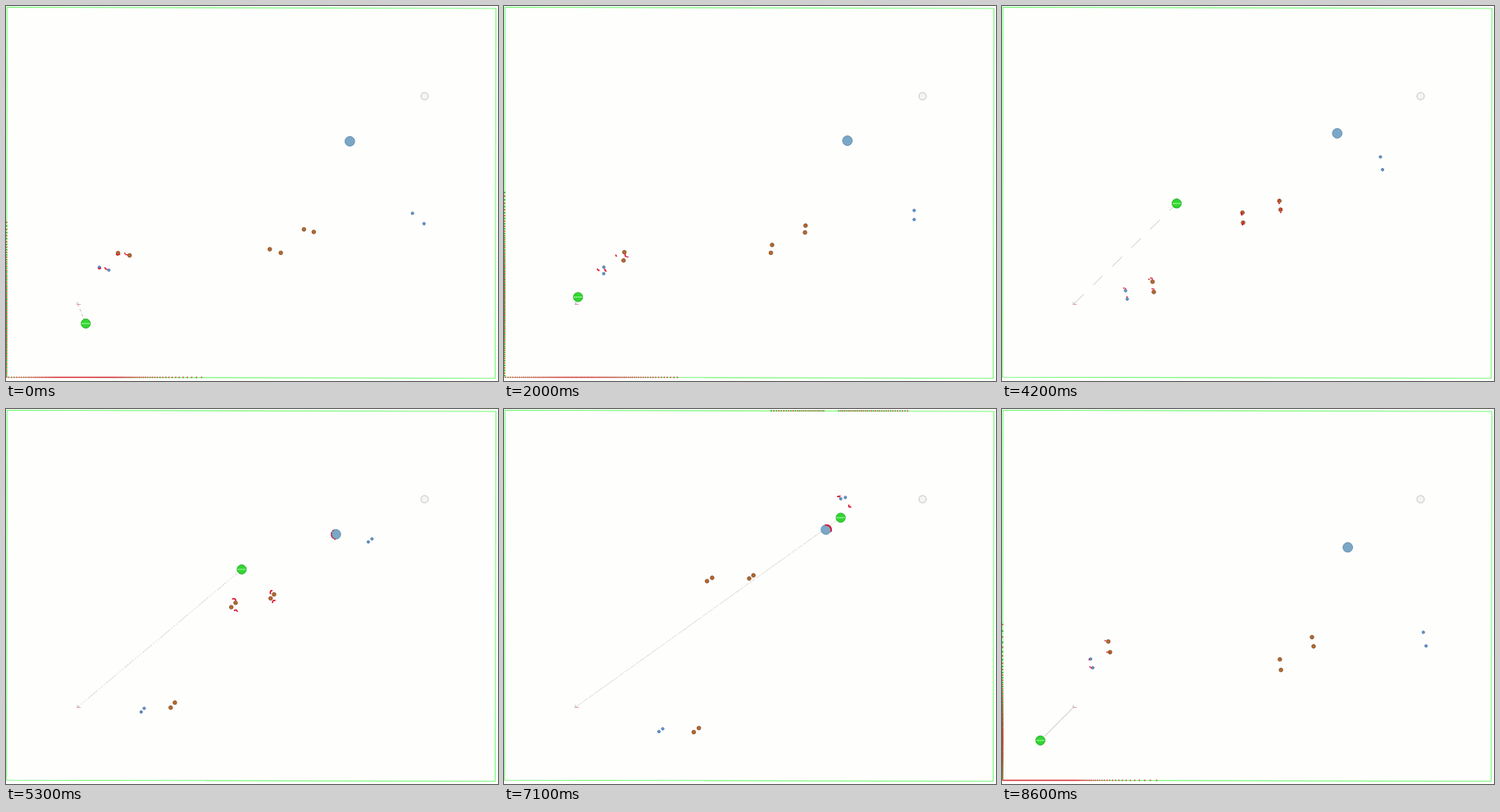
An HTML page that plays this animation: 600x458 px, repeating every 8.7 s.

```html
<!DOCTYPE html>
<html lang="en">
<head>
<meta charset="utf-8">
<title>Lidar robot among walkers</title>
<style>
html, body { margin: 0; width: 100%; height: 100%; overflow: hidden; background: #fefefd; }
svg { display: block; width: 100%; height: 100%; }
</style>
</head>
<body>
<svg id="stage" viewBox="0 0 600 458" preserveAspectRatio="none" fill="none">
  <rect width="600" height="458" fill="#fefefd"/>
  <path d="M1.2 1.5L597.5 3L596.5 454.7L.7 453.2Z" stroke="#78f878" stroke-width="1.1"/>
  <circle cx="510.5" cy="110.2" r="4.4" fill="#f5f5f2" stroke="#d6d6d6" stroke-width="1.5"/>
  <path id="trail" stroke="#c3bfbb" stroke-width="1"/>
  <path d="M87 361.5V365" stroke="#a9bcbc" stroke-width=".9"/>
  <path d="M86.5 364.4H91" stroke="#d99090" stroke-width=".9"/>
  <g id="bodies"></g>
  <path id="wallGreen" stroke="#2f8f10" stroke-width="1.5"/>
  <path id="wallRed" stroke="#d8303a" stroke-width="1.5"/>
  <path id="hits" stroke="#dd0c26" stroke-width="1.5"/>
  <g id="robot">
    <circle r="5.6" fill="#2fd82f" stroke="#1fa81f" stroke-width=".9"/>
    <path d="M-5 0H5" stroke="#d9f7d9" stroke-width="1" stroke-dasharray="1.7 .5"/>
  </g>
</svg>
<script>
const LOOP = 8700, STEP = 100, RANGE = 157, ORIGIN = [87.5, 364];
const $ = id => document.getElementById(id);

// Walkers: start, velocity, stride, foot spacing
const BROWN = { r: 2.3, fill: '#b9692f', edge: '#7d4a22' };
const BLUE = { r: 1.6, fill: '#6398d2', edge: '#48709f' };
const walkers = [
  { x: 108, y: 309.3, vx: 13.65, vy: 13.6, stride: 11, gap: 5.7, look: BLUE },
  { x: 129, y: 288.8, vx: 17.3, vy: 16.95, stride: 12.5, gap: 7.9, look: BROWN },
  { x: 341, y: 314, vx: -14.8, vy: -17.35, stride: 12.5, gap: 7.4, look: BROWN },
  { x: 380.3, y: 285.6, vx: -12.9, vy: -13.2, stride: 11, gap: 6.4, look: BROWN },
  { x: 517.2, y: 283.9, vx: -17, vy: -28.7, stride: 18.8, gap: 5.7, look: BLUE }
];
const BALL = { r: 5.9, fill: '#7ba7c6', edge: '#5a86a8' };

// Waypoints: time, x, y
const ballPath = [[0, 422, 169.5], [1, 418.8, 164.5], [1.9, 415, 160], [3.2, 408.8, 155.5],
  [5.3, 396.5, 150.5], [6.8, 389.5, 144.3], [7.5, 387, 142]];
const mainRun = [[0, 41, 410], [.1, 46.8, 404.8], [1, 90.3, 355.5], [1.9, 130, 294],
  [3.2, 213, 241.2], [5.3, 356, 157.5], [6.8, 459, 115.8], [7.5, 510, 110.5]];
const crashRun = [[.85, 97.3, 387.8], [1.3, 115, 364], [1.85, 131, 338]];

function along(pts, s) {
  const last = pts.length - 1;
  let i = 0;
  while (i < last - 1 && s > pts[i + 1][0]) i++;
  const a = pts[i], b = pts[i + 1], h = b[0] - a[0];
  const u = Math.max(0, Math.min(1, (s - a[0]) / h));
  const slope = (j, k) => {
    const p = pts[Math.max(0, j - 1)], q = pts[Math.min(last, j + 1)];
    return (q[k] - p[k]) / (q[0] - p[0]);
  };
  const w = u * u * (3 - 2 * u);
  return [1, 2].map(k => a[k] + (b[k] - a[k]) * w +
    h * u * (1 - u) * ((1 - u) * slope(i, k) - u * slope(i + 1, k)));
}

function bodiesAt(s) {
  const swing = Math.cos(12.2 * s + 2.47), out = [];
  for (const w of walkers) {
    const v = Math.hypot(w.vx, w.vy), ex = w.vx / v, ey = w.vy / v;
    const cx = w.x + w.vx * s, cy = w.y + w.vy * s;
    const dx = (ex * w.stride * swing + ey * w.gap) / 2;
    const dy = (ey * w.stride * swing - ex * w.gap) / 2;
    out.push({ x: cx - dx, y: cy - dy, look: w.look }, { x: cx + dx, y: cy + dy, look: w.look });
  }
  const [x, y] = along(ballPath, s);
  out.push({ x, y, look: BALL });
  return out;
}

const dots = bodiesAt(0).map(({ look }) => {
  const c = document.createElementNS('http://www.w3.org/2000/svg', 'circle');
  const attrs = { r: look.r, fill: look.fill, stroke: look.edge, 'stroke-width': .8 };
  for (const k in attrs) c.setAttribute(k, attrs[k]);
  $('bodies').appendChild(c);
  return c;
});

const mark = (x, y) => `M${(x - .75).toFixed(1)} ${y.toFixed(1)}h1.5`;

// One ray per degree; bodies are seen one scan late
function scan(rx, ry, bodies) {
  let red = '', green = '', hits = '';
  for (let deg = 0; deg < 360; deg++) {
    const a = deg * Math.PI / 180, cx = Math.cos(a), cy = Math.sin(a);
    const wallX = ((cx < 0 ? .8 : 597.2) - rx) / cx;
    const wallY = ((cy < 0 ? 2.3 : 453.6) - ry) / cy;
    let best = Math.min(wallX, wallY), onBody = false;
    for (const b of bodies) {
      const dx = b.x - rx, dy = b.y - ry, f = dx * cx + dy * cy;
      const rad = b.look.r + .2, q = rad * rad - dx * dx - dy * dy + f * f;
      if (f > 0 && q >= 0 && f - Math.sqrt(q) < best) {
        best = f - Math.sqrt(q);
        onBody = true;
      }
    }
    if (best > RANGE) continue;
    const m = mark(rx + cx * best, ry + cy * best);
    const leftOrTop = wallX < wallY ? cx < 0 : cy < 0;
    if (onBody) hits += m;
    else if (leftOrTop && deg % 2) green += m;
    else red += m;
  }
  $('wallRed').setAttribute('d', red);
  $('wallGreen').setAttribute('d', green);
  $('hits').setAttribute('d', hits);
}

// Thin line broken up by half-pixel sampling
function trail(rx, ry) {
  const [ox, oy] = ORIGIN, dx = rx - ox, dy = ry - oy;
  const n = Math.max(Math.abs(dx), Math.abs(dy));
  const minor = Math.min(Math.abs(dx), Math.abs(dy)) / n;
  let d = '';
  for (let i = 0; i < n - 5; i++) {
    const f = -2 * minor * i;
    if (f - Math.floor(f) >= .5) continue;
    const x = ox + dx * i / n, y = oy + dy * i / n;
    d += `M${x.toFixed(1)} ${y.toFixed(1)}l${(dx / n).toFixed(2)} ${(dy / n).toFixed(2)}`;
  }
  $('trail').setAttribute('d', d);
}

function draw(ms) {
  const t = Math.floor((ms % LOOP) / STEP) / 10;
  const crash = t < 1;
  const s = crash ? t + .85 : t < 8.5 ? t - 1 : t - 8.5;
  const [rx, ry] = along(crash ? crashRun : mainRun, s);
  bodiesAt(s).forEach((b, i) => {
    dots[i].setAttribute('cx', b.x.toFixed(2));
    dots[i].setAttribute('cy', b.y.toFixed(2));
  });
  $('robot').setAttribute('transform', `translate(${rx.toFixed(2)} ${ry.toFixed(2)})`);
  trail(rx, ry);
  scan(rx, ry, bodiesAt(Math.max(0, s - .1)));
}

const start = performance.now();
function tick() {
  draw(performance.now() - start);
  requestAnimationFrame(tick);
}
tick();
</script>
</body>
</html>
```
